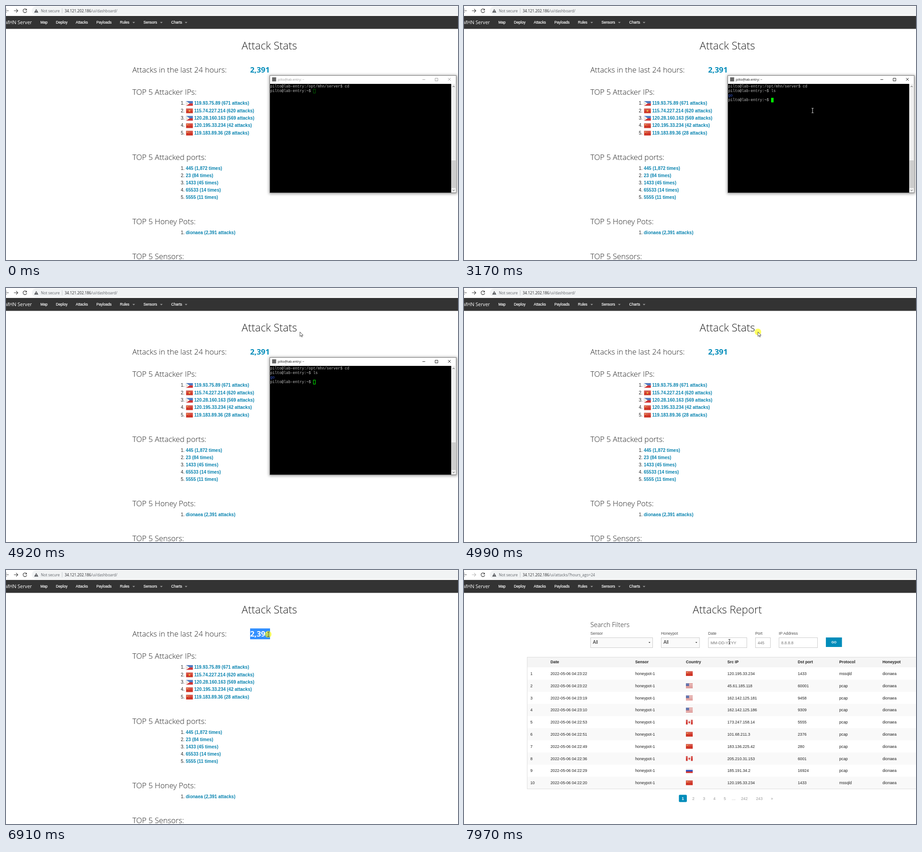
These frames come from a looping animation (998x561 px, 8 s). An HTML page:

```html
<!DOCTYPE html>
<html lang="en">
<head>
<meta charset="utf-8">
<title>Attack dashboard</title>
<style>
html, body { margin: 0; width: 100%; height: 100%; overflow: hidden; background: #fff; }
svg { display: block; width: 998px; height: 561px; }
text { white-space: pre; fill: #222; font: 8.72px "Liberation Sans", Arial, sans-serif; }
.h2, .h3, .h4 { font-family: "Open Sans", sans-serif; font-weight: 300; }
.h2 { font-size: 23.4px; text-anchor: middle; }
.h3 { font-size: 16.85px; }
.h4 { font-size: 14.4px; }
.total { font: 700 16.8px "Open Sans", sans-serif; fill: #008cba; }
.item { font-size: 10px; }
.link { font-size: 10px; font-weight: 700; fill: #0a84b0; }
.url { font: 8.25px "Open Sans", sans-serif; fill: #5f6368; }
.brand { font: 10.6px "Open Sans", sans-serif; fill: #fff; text-anchor: end; }
.nav { font-size: 8.2px; fill: #fff; stroke: #fff; stroke-width: .2px; }
.label { fill: #4d4d4d; }
.hint { font-size: 8.8px; fill: #757575; }
.bold { font-weight: 700; }
.page { fill: #999; text-anchor: middle; }
.go { font-size: 7.2px; fill: #fff; text-anchor: middle; }
.caption { font: 7.1px "Open Sans", sans-serif; fill: inherit; }
.term { font: 8.333px "Liberation Mono", "Courier New", monospace; fill: #bbb; }
.dir { fill: #3458d6; }
</style>
</head>
<body>
<svg id="stage" viewBox="0 0 998 561"></svg>
<script>
const text = (x, y, s, cls = '', id = '') => `<text x="${x}" y="${y}" class="${cls}" id="${id}">${s}</text>`;
const rect = (x, y, w, h, fill, more = '') => `<rect x="${x}" y="${y}" width="${w}" height="${h}" fill="${fill}" ${more}/>`;
const path = (d, more = 'fill="none" stroke="#333"') => `<path d="${d}" ${more}/>`;
const group = (id, s, more = '') => `<g id="${id}" ${more}>${s}</g>`;
const down = (x, y, r, fill) => path(`M${x - r} ${y}h${2 * r}l${-r} ${r}z`, `fill="${fill}"`);

const star = (x, y, r, fill) => path('M' + Array.from({ length: 10 }, (_, i) => {
  const a = i * Math.PI / 5, q = i % 2 ? r * .4 : r;
  return (x + q * Math.sin(a)).toFixed(2) + ' ' + (y - q * Math.cos(a)).toFixed(2);
}).join('L') + 'z', `fill="${fill}"`);

const flags = {
  ph: rect(0, 0, 15, 5.2, '#3565b5') + rect(0, 5.2, 15, 5.2, '#d03434') +
      path('M0 0L8 5.2L0 10.4z', 'fill="#f4f4f4"') + star(2.6, 5.2, 1.3, '#e8c040'),
  vn: rect(0, 0, 15, 10.4, '#cf3a2a') + star(7.5, 5.3, 2.8, '#f6c83c'),
  cn: rect(0, 0, 15, 10.4, '#cf3527') + star(3, 3, 1.9, '#f3c33c') +
      [[6, 1.3], [7, 2.7], [7, 4.3], [6, 5.6]].map(([x, y]) => star(x, y, .7, '#f3c33c')).join(''),
  us: [0, 1, 2, 3, 4, 5, 6].map(i => rect(0, i * 1.49, 15, 1.49, i % 2 ? '#f2e6e6' : '#cc5550')).join('') +
      rect(0, 0, 7, 5.6, '#4a62a4'),
  ca: rect(0, 0, 15, 10.4, '#f4f0f0') + rect(0, 0, 3.8, 10.4, '#d23a34') + rect(11.2, 0, 3.8, 10.4, '#d23a34') +
      star(7.5, 5.2, 3.2, '#d23a34') + rect(7.1, 5, .8, 3.2, '#d23a34'),
  ru: rect(0, 0, 15, 3.5, '#f2f2f2') + rect(0, 3.5, 15, 3.5, '#3048b8') + rect(0, 7, 15, 3.4, '#d03a34')
};
const flag = (x, y, code) => group('', flags[code] + rect(0, 0, 15, 4.6, '#fff', 'opacity=".14"'),
  `transform="translate(${x} ${y - 5.2})"`);

const arrow = 'l0 0M0 0h8.5M4.8 -3.9l3.9 3.9l-3.9 3.9';
const browser = rect(0, 0, 998, 22, '#fff') + rect(57, 1, 960, 19, '#f1f3f4', 'rx="9.5"') +
  path('M6 10.5H-3M1 6.5L-3 10.5L1 14.5', 'fill="none" stroke="#555" stroke-width="1.2"') +
  group('forward', path('M0 0' + arrow, 'fill="none" stroke-width="1.2"'), 'transform="translate(17.5 10.5)"') +
  path('M45.2 8.2A4.1 4.1 0 1 0 45.8 11.3', 'fill="none" stroke="#444" stroke-width="1.2"') +
  path('M46 5.8v3.6h-3.6z', 'fill="#444"') +
  path('M66.8 6.4L71.4 14.6H62.2z', 'fill="#505357"') + rect(66.3, 9, 1, 2.6, '#fff') + rect(66.3, 12.3, 1, 1, '#fff') +
  text(77, 13.7, 'Not secure', 'url') + rect(123.5, 5, 1, 11, '#c4c7ca') +
  text(129.5, 13.7, '', 'url', 'address') + rect(0, 22, 998, 28.5, '#333') +
  text(57.2, 40.4, 'MHN Server', 'brand') +
  [[76, 'Map'], [110.3, 'Deploy'], [154, 'Attacks'], [199.5, 'Payloads'], [251.5, 'Rules'], [303.5, 'Sensors'], [364.8, 'Charts']]
    .map(([x, s]) => text(x, 39.4, s, 'nav')).join('') +
  [282, 343, 397.6].map(x => down(x, 35.3, 2.9, '#999')).join('');

const list = (y, step, rows) => rows.map(([s, code], i) => {
  const base = y + i * step;
  return text(386, base, i + 1 + '.', 'item') + (code ? flag(397.6, base - 3, code) : '') +
    text(code ? 415.5 : 397, base, s, 'link');
}).join('');

const stats = text(581.5, 96, 'Attack Stats', 'h2') +
  text(279, 147, 'Attacks in the last 24 hours:', 'h3') + rect(539, 129, 0, 24, '#3390ff', 'id="selection"') +
  text(539, 147.2, [...'2,391'].map(c => `<tspan class="digit">${c}</tspan>`).join(''), 'total') +
  text(279, 196, 'TOP 5 Attacker IPs:', 'h3') +
  list(218.2, 16.4, [['119.93.75.89 (671 attacks)', 'ph'], ['115.74.227.214 (620 attacks)', 'vn'],
    ['120.28.160.163 (569 attacks)', 'ph'], ['120.195.33.234 (42 attacks)', 'cn'], ['119.183.89.36 (28 attacks)', 'cn']]) +
  text(279, 340.4, 'TOP 5 Attacked ports:', 'h3') +
  list(362, 16, [['445 (1,872 times)'], ['23 (84 times)'], ['1433 (45 times)'], ['65533 (14 times)'], ['5555 (11 times)']]) +
  text(279, 482, 'TOP 5 Honey Pots:', 'h3') + list(503.6, 16, [['dionaea (2,391 attacks)']]) +
  text(279, 559, 'TOP 5 Sensors:', 'h3');

const field = (x, w, label, value, select) => text(x, 143, label, 'label') +
  rect(x + .5, 149.5, w, 22, select ? '#fafafa' : '#fff', 'stroke="#ccc"') +
  text(x + 5.5, select ? 163.4 : 163.8, value, select ? 'item' : 'hint') +
  (select ? down(x + w - 6.5, 159.3, 2, '#111') : '');
const cols = [146.5, 191, 378, 490, 581.5, 737, 828.5, 924];
const attacks = [
  ['23:22', 'cn', '120.195.33.234', 1433], ['23:22', 'us', '45.61.185.118', 60001],
  ['23:19', 'us', '162.142.125.181', 9458], ['23:10', 'us', '162.142.125.186', 9309],
  ['22:53', 'ca', '173.247.158.14', 5555], ['22:51', 'cn', '101.68.211.3', 2376],
  ['22:49', 'cn', '183.136.225.42', 280], ['22:36', 'ca', '205.210.31.153', 6001],
  ['22:29', 'ru', '185.191.34.2', 16924], ['22:20', 'cn', '120.195.33.234', 1433]
];
const report = text(581.5, 96, 'Attacks Report', 'h2') + text(279, 126, 'Search Filters', 'h4') +
  field(279, 137, 'Sensor', 'All', true) + field(435, 84.5, 'Honeypot', 'All', true) +
  field(539, 85, 'Date', 'MM-DD-YYYY') + field(643, 33, 'Port', '445') + field(695, 85, 'IP Address', '8.8.8.8') +
  rect(799, 149, 35.5, 21, '#008cba') + text(816.8, 161.6, 'GO', 'go bold') +
  rect(140, 192, 860, 23, '#f5f5f5') +
  ['', 'Date', 'Sensor', 'Country', 'Src IP', 'Dst port', 'Protocol', 'Honeypot']
    .map((s, i) => text(cols[i], 206.2, s, 'bold')).join('') +
  attacks.map(([time, code, ip, port], i) => {
    const y = 228.8 + i * 26.8;
    const cells = [i + 1, '2022-05-06 04:' + time, 'honeypot-1', '', ip, port, port === 1433 ? 'mssqld' : 'pcap', 'dionaea'];
    return (i % 2 ? rect(140, y - 13.4, 860, 26.8, '#f9f9f9') : '') + flag(490, y, code) +
      cells.map((s, k) => text(cols[k], y + 3.2, s)).join('');
  }).join('') +
  rect(139.5, 192.5, 870, 291, 'none', 'stroke="#ddd"') +
  rect(474.5, 496.5, 17.5, 16, '#008cba', 'rx="2"') +
  `<g style="--c:#fff">${text(483.2, 507.7, '<tspan fill="#fff">1</tspan>', 'page bold')}</g>` +
  [[506.5, 2], [530, 3], [553, 4], [576, 5], [595.3, '…'], [619, 242], [652, 243], [680, '»']]
    .map(([x, s]) => text(x, 507.7, s, 'page')).join('');

const user = 'pilto@lab-entry';
const prompt = user + ':~$ ';
const terminal =
  rect(581, 153, 415, 262, '#000', 'filter="url(#blur)" opacity=".38"') +
  rect(582.5, 153.5, 411.5, 259, '#fff', 'stroke="#777"') +
  rect(587.5, 157.5, 9, 9, '#666') +
  group('bar', text(600, 164.8, user + ': ~', 'caption') +
    path('M919.5 162.5h6M947.5 159.5h6v6h-6zM976 159l6 6M982 159l-6 6', 'fill="none" stroke-width=".9"')) +
  rect(583, 172, 400, 240, '#000') + rect(983, 172, 10.5, 240, '#f0f0f0') + rect(983.5, 341, 9.5, 61, '#cdcdcd') +
  path('M986.2 179l2.2 -2.2l2.2 2.2M986.2 406l2.2 2.2l2.2 -2.2') +
  text(583.2, 180.4, user + ':/opt/mhn/server$ cd', 'term') + text(583.2, 190.4, prompt, 'term', 'command') +
  group('output', text(583.2, 200.4, 'go', 'term dir') + text(583.2, 210.4, prompt, 'term')) +
  rect(0, 0, 4.3, 9, 'none', 'id="caret"');

const stage = document.getElementById('stage');
stage.innerHTML = '<defs><filter id="blur" x="-10%" y="-10%" width="120%" height="120%"><feGaussianBlur stdDeviation="3"/></filter></defs>' +
  rect(0, 0, 998, 561, '#fff') + group('stats', stats) + group('report', report) + browser + group('terminal', terminal) +
  '<circle id="press" r="7.3" fill="#ff0" opacity=".62"/>' +
  group('pointer', path('M0 0V10L2.4 7.8L4 11.3L5.4 10.6L3.9 7.3H7z', 'fill="#fff" stroke="#222" stroke-width=".8"')) +
  group('beam', path('M-2.2 -5h4.4M0 -5v10M-2.2 5h4.4', 'fill="none" stroke-width="1"'));

const el = id => document.getElementById(id);
const show = (id, on) => el(id).setAttribute('display', on ? 'inline' : 'none');
const set = (id, attrs) => { for (const k in attrs) el(id).setAttribute(k, attrs[k]); };
const within = (v, a, b) => v >= a && v < b;

// Pointer path: time, x, y
const moves = [[0, 690, 600], [219, 690, 600], [220, 690, 548], [780, 707.5, 222], [2870, 707.5, 222], [2950, 770, 231],
  [3150, 770, 231], [3760, 672, 205], [3960, 672, 205], [4030, 675, 230], [4210, 675, 230], [4880, 649, 97],
  [5130, 649, 97], [5360, 623, 81], [5590, 623, 81], [5700, 637, 82], [6080, 498, 140], [6320, 533, 142],
  [6480, 533, 142], [6880, 579, 142], [7260, 579, 142], [7400, 569, 141], [7560, 569, 141], [7820, 586, 156.5],
  [7969, 586, 156.5], [7970, 586, 158.3], [8000, 586, 158.3]];
const presses = [[850, 1060], [4960, 5140], [6420, 7060], [7400, 7560]];

function pointerAt(t) {
  const i = moves.findIndex(m => m[0] > t);
  const [t0, x0, y0] = moves[i - 1], [t1, x1, y1] = moves[i];
  const p = (t - t0) / (t1 - t0), e = p * p * (3 - 2 * p);
  return [x0 + (x1 - x0) * e, y0 + (y1 - y0) * e];
}

function draw() {
  const t = performance.now() % 8000;
  const open = t < 4990, active = t >= 900, focused = active && t < 4890, moved = t >= 7560, done = t >= 2540;

  show('stats', !moved);
  show('report', moved);
  el('address').innerHTML = '<tspan fill="#202124">34.121.202.186</tspan>' + (moved ? '/ui/attacks/?hours_ago=24' : '/ui/dashboard/');
  set('forward', { stroke: moved ? '#bbb' : '#444' });

  show('terminal', open);
  set('bar', { fill: active ? '#111' : '#999', stroke: 'none' });
  el('bar').lastChild.setAttribute('stroke', active ? '#111' : '#999');
  const typed = t < 2270 ? '' : t < 2370 ? 'l' : 'ls';
  el('command').textContent = prompt + typed;
  show('output', done);
  set('caret', {
    x: 583.7 + 5 * (prompt.length + (done ? 0 : typed.length)), y: done ? 203.3 : 183.3,
    fill: focused ? '#0f0' : 'none', stroke: active ? '#0f0' : '#007800', 'stroke-width': active ? 1 : .8
  });

  const [x, y] = pointerAt(t);
  const inTerminal = open && within(x, 583, 983) && within(y, 172, 412);
  const overText = !open && (within(y, 76, 98) && within(x, 521, 642) || within(y, 131, 172) && x < 625);
  const at = { transform: `translate(${x} ${y})` };
  const beam = inTerminal || overText;
  show('beam', beam);
  show('pointer', !beam);
  set('pointer', at);
  set('beam', { ...at, stroke: inTerminal ? '#ddd' : '#333' });
  set('press', at);
  show('press', presses.some(([a, b]) => within(t, a, b)));

  // Selection snaps to character edges while dragging
  const edges = [539, 548.6, 553.4, 563, 572.6];
  const count = within(t, 6480, 7400) ? edges.filter(e => x > e + 3).length : 0;
  set('selection', { width: count ? (edges[count] || 583) - 539 : 0 });
  document.querySelectorAll('.digit').forEach((d, i) => d.setAttribute('fill', i < count ? '#fff' : '#008cba'));
  requestAnimationFrame(draw);
}
draw();
</script>
</body>
</html>
```
